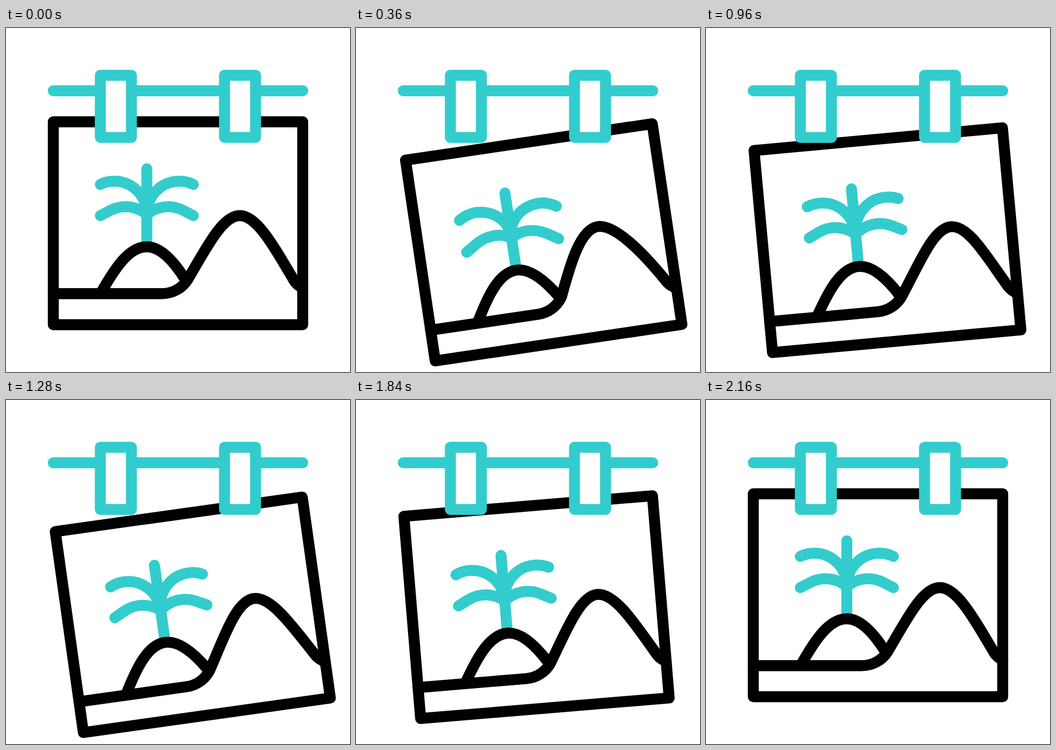
These frames come from a looping animation (640x640 px, 2400 ms). An HTML page:

```html
<!DOCTYPE html>
<html lang="en">
<head>
<meta charset="utf-8">
<title>Hanging picture</title>
<style>
  html, body { margin: 0; width: 100%; height: 100%; overflow: hidden; background: #fff; }
  svg { display: block; width: 100%; height: 100%; }
  .line { fill: none; stroke-width: 20.4; stroke-linecap: round; stroke-linejoin: round; }
  .ink { stroke: #000; }
  .teal { stroke: #33cccd; }
  .clip { fill: #fff; }
</style>
</head>
<body>
<svg viewBox="0 0 640 640">
  <defs>
    <path id="leaves"/>
    <rect id="clip" class="clip" x="175.5" y="88" width="57.8" height="115.6"/>
  </defs>
  <g id="board">
    <g class="line teal">
      <path d="M262 262V405"/>
      <use href="#leaves"/>
      <use href="#leaves" transform="translate(524) scale(-1 1)"/>
    </g>
    <g class="line ink">
      <rect x="88" y="174.5" width="464" height="377.5"/>
      <path d="M176 494C203 446 229 407 262 407C289 407 314 437 333 467"/>
      <path id="hill"/>
    </g>
  </g>
  <g class="line teal">
    <path d="M88 116.7H552"/>
    <use href="#clip"/>
    <use href="#clip" x="231"/>
  </g>
</svg>
<script>
const LOOP = 2400;
const STEP = 40;

const byId = id => document.getElementById(id);
const board = byId("board");
const leaves = byId("leaves");
const hill = byId("hill");

// Smooth 0..1 ramp between two times.
function ramp(time, from, to) {
  const p = Math.min(1, Math.max(0, (time - from) / (to - from)));
  return p * p * (3 - 2 * p);
}

// Swings out to a peak, overshoots the other way, then settles at zero.
function sway(time, peak, peakTime, over, overTime, end) {
  return peak * ramp(time, 0, peakTime)
    + (over - peak) * ramp(time, peakTime, overTime)
    - over * ramp(time, overTime, end);
}

function hangBoard(time) {
  const out = ramp(time, 0, 420);
  const relax = ramp(time, 480, 800);
  const again = ramp(time, 880, 1280);
  const stay = 1 - ramp(time, 1600, 2150);
  const angle = (8.9 * out - 4 * relax + 3.05 * again) * stay;
  const drop = (3.8 * out + 8 * relax - 5.7 * again) * stay;
  board.setAttribute("transform",
    `translate(${-0.1 * angle} ${drop}) rotate(${-angle} 552 174.5)`);
}

function leafPath(up, low) {
  const tipX = 175.5 - 0.5 * up;
  const tipY = 291 + up;
  const crest = 285 + 0.55 * up;
  return `M${tipX} ${tipY}C${tipX + 8} ${tipY - 4 - 0.2 * up} 192 ${crest} 201 ${crest}` +
    `C235 ${crest} 262 312 262 347` +
    `M175.5 ${349 + low}L195 ${339 + 0.8 * low}` +
    `C217 ${328 + 0.6 * low} 243 ${331 + 0.2 * low} 262 347`;
}

function hillPath(dx) {
  return `M88 494.2H290C310 494.2 328 484 338 468` +
    `C${372 + 0.8 * dx} 411 ${402 + dx} 349 ${435 + dx} 349` +
    `C${468 + dx} 349 501 411 536 470Q541 478 552 484`;
}

function draw(time) {
  hangBoard(time);
  const up = sway(time, 12.4, 540, -3.2, 960, 1360);
  const low = sway(time, 12, 400, -3, 960, 1360);
  leaves.setAttribute("d", leafPath(up, low));
  hill.setAttribute("d", hillPath(sway(time, -17.5, 600, 5, 980, 1440)));
}

const start = performance.now();

function tick() {
  const time = (performance.now() - start) % LOOP;
  draw(Math.floor(time / STEP) * STEP);
  requestAnimationFrame(tick);
}

draw(0);
requestAnimationFrame(tick);
</script>
</body>
</html>
```
